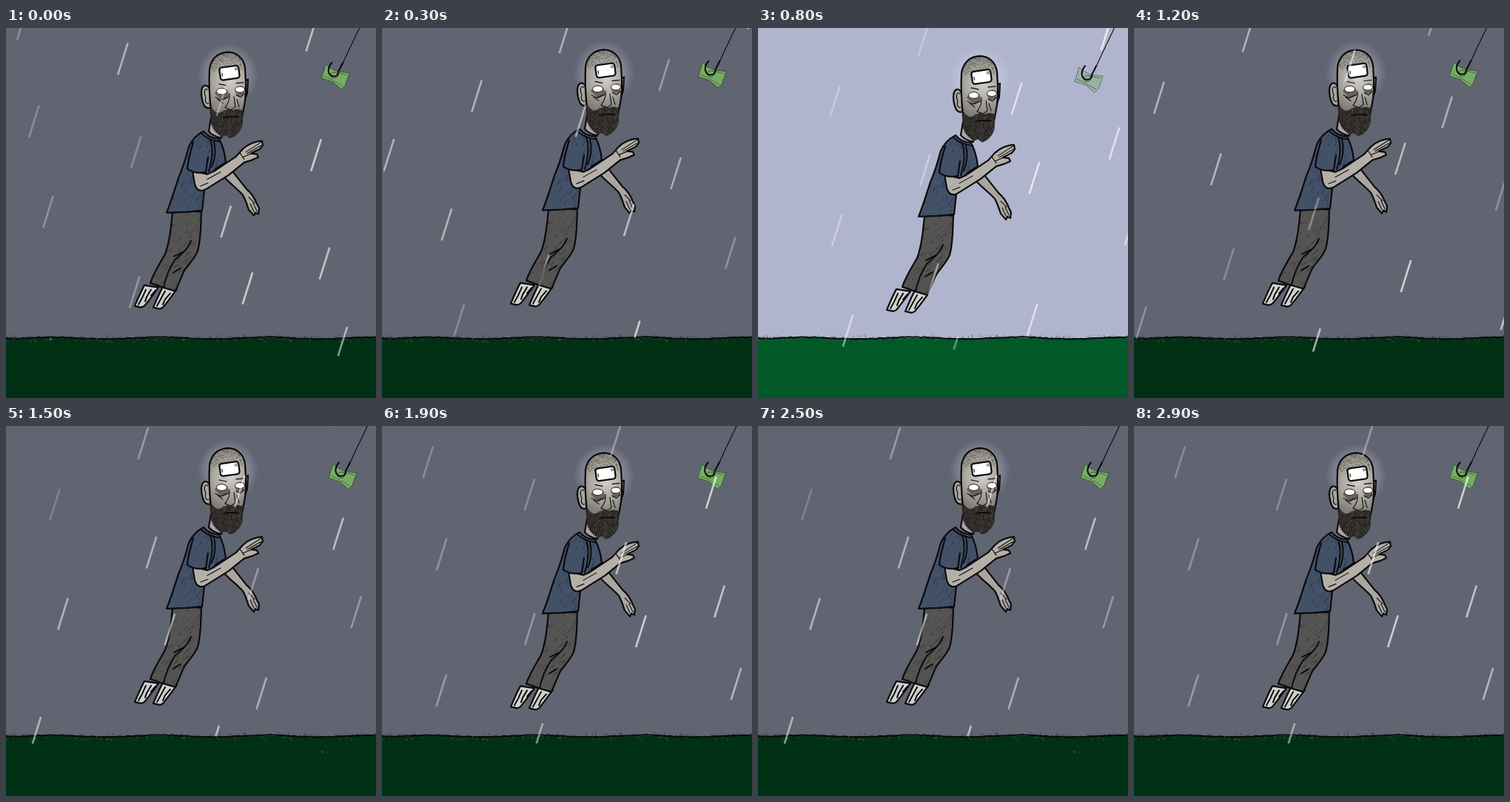
An HTML page with a canvas that plays this animation: 500 by 500 pixels, repeating every 3 s.

```html
<!DOCTYPE html>
<html lang="en">
<head>
<meta charset="utf-8">
<title>Night rain</title>
<style>
  html, body { margin: 0; width: 100%; height: 100%; overflow: hidden; background: #62646f; }
  svg, canvas { position: absolute; left: 0; top: 0; width: 500px; height: 500px; }
  .ink { stroke: #0b0b0c; stroke-width: 2.2; stroke-linejoin: round; stroke-linecap: round; }
  .line { fill: none; stroke: #0b0b0c; stroke-width: 1.1; stroke-linecap: round; stroke-linejoin: round; }
  .thin { stroke-width: .8; opacity: .4; }
  .fold { stroke-width: 2; }
</style>
</head>
<body>
<svg viewBox="0 0 500 500">
  <defs>
    <radialGradient id="glow">
      <stop offset=".5" stop-color="#e8ecff" stop-opacity=".32"/>
      <stop offset=".8" stop-color="#e8ecff" stop-opacity=".14"/>
      <stop offset="1" stop-color="#e8ecff" stop-opacity="0"/>
    </radialGradient>
    <radialGradient id="skin" gradientUnits="userSpaceOnUse" cx="303" cy="72" r="42">
      <stop offset="0" stop-color="#d2cfca"/>
      <stop offset=".5" stop-color="#aeaaa4"/>
      <stop offset="1" stop-color="#827e78"/>
    </radialGradient>
    <path id="face" d="M277 112C275 94 274 74 275 56C277 42 286 34 299 33C312 33 321 41 323 54L324 74C325 92 322 106 319 120L304 136L280 126Z"/>
    <path id="beard" d="M276 106C280 113 285 117 290 115C296 111 300 110 306 112C312 110 316 110 320 113L319 132C316 141 310 147 303 149L297 145L292 147C283 142 277 134 277 124Z"/>
    <path id="shirt" d="M267 140C257 145 251 152 247 161C243 176 239 190 233 203C228 219 223 235 217 250L243 249L265 247L268 219L284 190L297 182C296 171 293 160 288 150C280 150 272 146 267 140Z"/>
    <path id="pants" d="M225 249L264 248C263 266 264 284 259 302C254 314 244 322 240 330L229 356L212 351L195 345C199 332 207 320 215 306C221 290 223 270 225 249Z"/>
    <clipPath id="inFace"><use href="#face"/></clipPath>
    <clipPath id="inBeard"><use href="#beard"/></clipPath>
    <clipPath id="inShirt"><use href="#shirt"/></clipPath>
    <clipPath id="inPants"><use href="#pants"/></clipPath>
  </defs>

  <rect width="500" height="500" fill="#b0b5cd"/>
  <path d="M0 419H500V500H0Z" fill="#005927"/>
  <rect id="shade" width="500" height="500"/>
  <path id="soil" class="line fold"/>
  <path id="blades" class="line thin"/>
  <path id="petals" fill="none" stroke="#8c3f48" stroke-width="1.4" opacity=".7"/>

  <g id="man">
    <ellipse cx="300" cy="64" rx="41" ry="43" fill="url(#glow)"/>

    <path class="ink" fill="#aaa69f" d="M293 200C303 211 313 218 320 226C324 233 326 240 328 246L335 254L337 250L341 252L342 244L339 238C336 230 331 223 325 218L306 194Z"/>
    <path class="line" d="M328 229L336 237M330 238L335 249M334 237L339 248"/>

    <path id="shoe" class="ink" fill="#d0d0ce" d="M187 348L206 351C200 359 194 368 187 376L183 378L174 376C178 367 182 357 187 348Z"/>
    <use href="#shoe" x="25" y="2"/>
    <path class="line fold" d="M189 354L184 365L179 374M196 354L190 364L188 370M202 355L196 362M215 356L209 367L204 376M222 359L215 367L212 374"/>

    <use href="#pants" class="ink" fill="#555452"/>
    <path id="pantsHatch" class="line thin" clip-path="url(#inPants)"/>
    <path class="line fold" d="M250 288C245 302 234 307 228 314C220 326 216 337 213 350M241 302L227 309M236 325L226 331"/>

    <path class="ink" fill="#aaa69f" d="M277 122L274 140C280 147 287 148 291 149L292 138Z"/>
    <use href="#shirt" class="ink" fill="#435168"/>
    <path id="shirtHatch" class="line thin" clip-path="url(#inShirt)"/>
    <path class="line fold" d="M264 143C271 150 281 153 289 154M276 151C280 163 279 178 274 194M281 154C284 166 282 179 278 188"/>

    <path class="ink" fill="#b4afa8" d="M252 193L255 211C257 219 262 222 269 219L301 199L322 182L332 179L341 175L339 171L331 170L343 164L347 159L346 153C338 153 327 157 320 164L311 174L281 194L272 198Z"/>
    <path class="line" d="M324 168L346 154M326 170L345 159M320 175L332 170M316 169L322 178M272 205L290 195M263 214L273 210"/>
    <path class="ink" fill="#435168" d="M253 155C249 168 246 179 245 191C253 196 262 197 270 195L273 175"/>

    <path class="ink" fill="#aaa69f" d="M276 84C271 74 264 77 264 89C265 103 269 111 276 108Z"/>
    <path class="line" d="M273 84C268 80 267 88 270 94C268 100 271 104 274 102"/>
    <path class="ink" fill="#aaa69f" d="M323 72L327 70L326 88L323 97Z"/>
    <use href="#face" class="ink" fill="url(#skin)"/>
    <path id="stubble" class="line thin" clip-path="url(#inFace)"/>
    <path d="M282 89C286 81 296 80 300 86L302 94L292 99ZM309 85C313 77 321 77 323 82L321 91L313 93Z" fill="#4b4743" opacity=".7"/>
    <path class="line" d="M283 94L290 98L300 94M286 97L293 102M311 91L317 94L322 89M302 89C303 97 300 102 296 108L304 111L310 107L308 93M312 97L315 107M288 76L298 78M311 75L321 74"/>
    <g fill="#fff" stroke="#222">
      <ellipse cx="291.500" cy="86" rx="7" ry="4.300"/>
      <ellipse cx="316" cy="83.500" rx="6.500" ry="4"/>
    </g>
    <use href="#beard" fill="#2b2826" stroke="#1a1817" stroke-width="1.600" stroke-dasharray="1.500 1.600"/>
    <path id="beardHair" class="line thin" style="stroke:#777068" clip-path="url(#inBeard)"/>
    <path class="line fold" d="M294 122C300 119 308 120 314 121"/>
    <g transform="rotate(-8 302 61)">
      <rect class="ink" x="289" y="52.500" width="26" height="17" rx="3.500" fill="#fff"/>
      <circle cx="311.500" cy="57" r="1.500" fill="#fff" stroke="#222" stroke-width=".8"/>
      <path class="line" d="M292 60V64"/>
    </g>
  </g>

  <g id="bait">
    <path class="line" d="M482 -12L477 0L464 27L453 51"/>
    <path class="line fold" d="M455 46L450 56"/>
    <path d="M432 48L437 53L448 58L464 60L458 77L453 82L441 72L426 67Z" fill="#78ab65" stroke="#35533a"/>
    <path id="faded" d="M432 48L437 53L448 58L464 60L458 77L453 82L441 72L426 67Z" fill="#a4b5be"/>
    <path d="M429 64L440 69L455 78M446 59L461 63" fill="none" stroke="#3b6b3a" stroke-width=".9"/>
    <ellipse cx="443" cy="63" rx="5" ry="4" fill="none" stroke="#35533a"/>
    <path class="line fold" d="M440 46C434 53 434 61 440 64C446 66 450 62 449 57"/>
  </g>
</svg>
<canvas id="rain" width="500" height="500"></canvas>

<script>
const $ = id => document.getElementById(id);
const TAU = 2 * Math.PI;
let seed = 7;
const rnd = (a, b) => {
  seed = (seed * 16807) % 2147483647;
  return a + (b - a) * seed / 2147483647;
};

// Scatter n short strokes over a box, each running by about (dx, dy).
function hatch(id, n, x0, y0, x1, y1, dx, dy) {
  let d = '';
  for (let i = 0; i < n; i++) {
    const k = rnd(.5, 1.2);
    d += `M${rnd(x0, x1).toFixed(1)} ${rnd(y0, y1).toFixed(1)}l${(dx * k).toFixed(1)} ${(dy * k).toFixed(1)}`;
  }
  $(id).setAttribute('d', d);
}
hatch('pantsHatch', 150, 190, 248, 266, 358, 5, -4);
hatch('shirtHatch', 150, 214, 140, 298, 252, 3, -6);
hatch('stubble', 380, 273, 32, 325, 58, .6, .7);
hatch('beardHair', 170, 274, 108, 322, 150, 1, 3);
hatch('blades', 130, 0, 417, 500, 420, -1, -2.5);
hatch('petals', 50, 0, 420, 500, 424, 2, .7);

let soil = 'M0 419';
for (let x = 4; x <= 500; x += 4)
  soil += `L${x} ${(419 - 1.3 * Math.cos(TAU * (x - 62) / 145) + rnd(-.5, .5)).toFixed(1)}`;
$('soil').setAttribute('d', soil);

const DROPS = 28, SLANT = .315, LENGTH = 43;
const drops = Array.from({ length: DROPS }, (_, i) => ({
  x: 20 + 640 * ((i * .618) % 1),
  phase: (i + rnd(0, .8)) / DROPS,
  fall: rnd(740, 840),
  floor: rnd(418, 447),
  alpha: rnd(.2, .7)
}));
const ctx = $('rain').getContext('2d');
ctx.lineWidth = 2.7;

function drawRain(p) {
  ctx.clearRect(0, 0, 500, 500);
  for (const { x, phase, fall, floor, alpha } of drops) {
    const head = (p + phase) % 1 * fall, tail = head - LENGTH;
    const end = Math.min(head, floor);
    if (tail >= end) continue;
    ctx.strokeStyle = `rgba(255,255,255,${alpha})`;
    ctx.beginPath();
    ctx.moveTo(x - tail * SLANT, tail);
    ctx.lineTo(x - end * SLANT, end);
    ctx.stroke();
  }
}

// Cyclic waves over one second: a round one, and one with a narrow crest.
const wave = (p, peak) => Math.cos(TAU * (p - peak));
const crest = (p, peak, k) => Math.exp(k * (wave(p, peak) - 1));
const bump = (t, peak, width) => Math.max(0, 1 - Math.abs(t - peak) / width);

function draw(t) {
  const p = t % 1000 / 1000;
  const strike = bump(t, 800, 370), second = bump(t, 2200, 200);
  $('shade').setAttribute('opacity', .45 * (1 - strike - second));
  $('faded').setAttribute('opacity', .75 * strike ** 3 + .25 * second);
  $('man').setAttribute('transform', `translate(0 ${9 * crest(p, .82, 1.6) - 4})`);
  $('bait').setAttribute('transform', `translate(${12 * crest(p, .57, 2)} ${2 + 4 * wave(p, .7)})`);
  drawRain(p);
}

const start = performance.now();
let last = -1;
function tick() {
  const t = Math.floor((performance.now() - start) / 100) % 30 * 100;
  if (t !== last) draw(last = t);
  requestAnimationFrame(tick);
}
tick();
</script>
</body>
</html>
```
